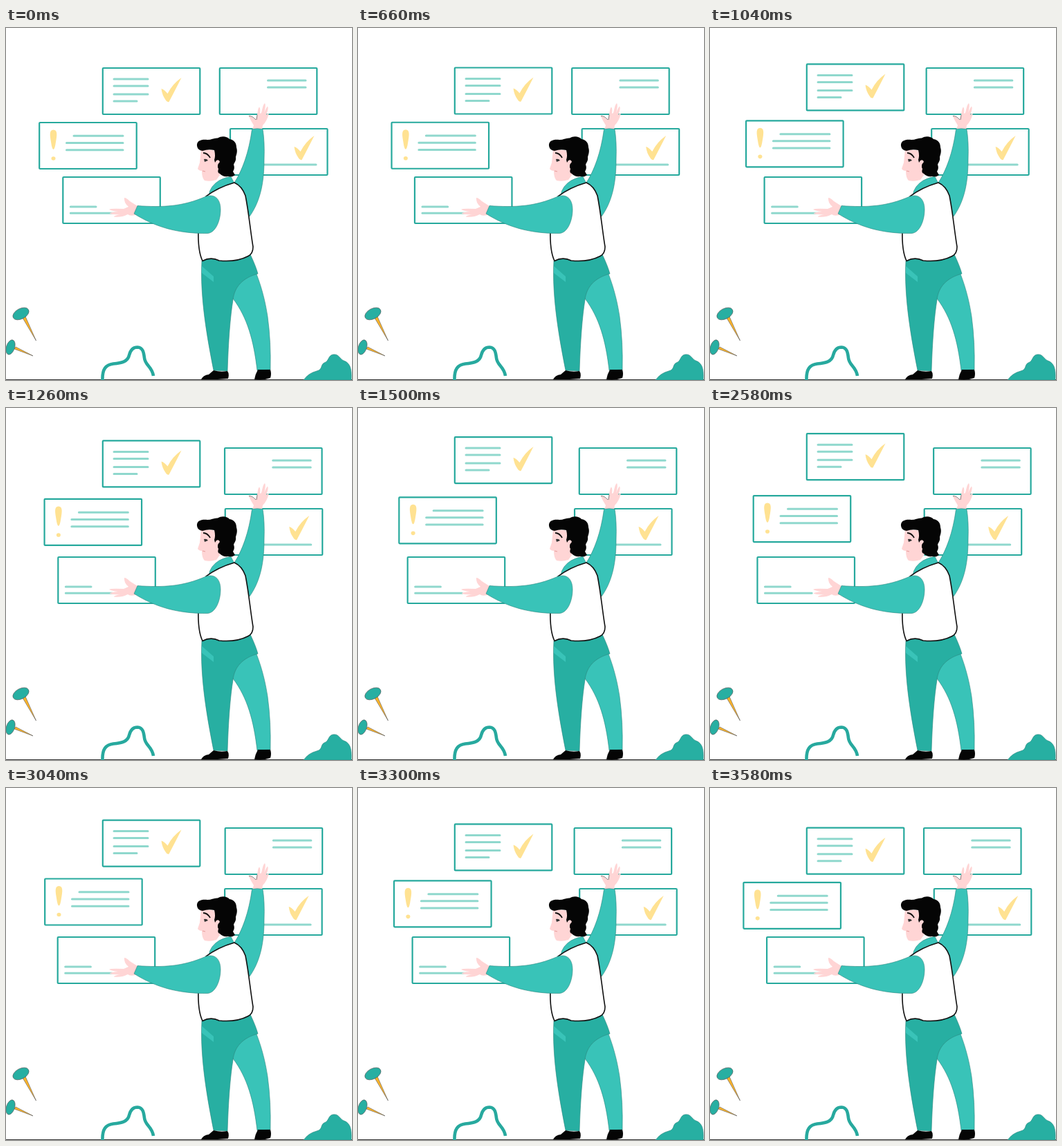
An HTML page for the animation above (3600 ms loop, 500x510 px).

```html
<!DOCTYPE html>
<html lang="en">
<head>
<meta charset="utf-8">
<title>Arranging cards</title>
<style>
  html, body { margin: 0; width: 100%; height: 100%; overflow: hidden; background: #fff; }
  svg { display: block; }
  .line { fill: none; stroke: #8fd8cd; stroke-width: 3; stroke-linecap: round; }
  .mark { fill: #ffe292; }
  .dark { fill: #27afa2; }
  .light { fill: #39c3b8; }
  .edge { stroke: #2b857d; stroke-width: .6; }
  .skin { fill: #ffd5d5; }
  .ink { fill: #050505; }
</style>
</head>
<body>
<svg width="500" height="510" viewBox="0 0 500 510">
  <defs>
    <rect id="frame" width="140.5" height="67" rx="1" fill="#fff" stroke="#26a99d" stroke-width="2.2"/>
    <path id="check" class="mark" d="M0 16Q4 17 9 23Q16 9 29 0Q21 16 11 35Q8 36 6 32Q1 25 0 16Z"/>
  </defs>

  <g class="card" data-dx="0" data-dy="-21.5">
    <use href="#frame" x="139.8" y="58"/>
    <path class="line" d="M156 74H205M156 84H205M156 96H205M156 106H189"/>
    <use href="#check" x="224.5" y="72"/>
  </g>
  <g class="card" data-dx="15" data-dy="-10.3">
    <use href="#frame" x="48.2" y="137"/>
    <path class="line" d="M98 156.3H169M87.5 166.5H169M87.5 176.7H169"/>
    <path class="mark" d="M68.5 147.500C75 147.5 73.5 156 72 165Q70.5 176 68.5 176Q66.5 176 65 165C63.5 156 62 147.5 68.5 147.5Z"/>
    <ellipse class="mark" cx="68.5" cy="189" rx="3" ry="2.8"/>
  </g>
  <g class="card" data-dx="-14.3" data-dy="0">
    <use href="#frame" x="82.3" y="216"/>
    <path class="line" d="M93.3 259H130M93.3 268.3H161"/>
  </g>
  <g class="card" data-dx="14.8" data-dy="0">
    <use href="#frame" x="308.8" y="58"/>
    <path class="line" d="M378.5 76H433M378.5 86H433"/>
  </g>
  <g class="card" data-dx="-14.8" data-dy="0">
    <use href="#frame" x="324" y="146"/>
    <path class="line" d="M362 198H448"/>
    <use href="#check" x="416.5" y="156"/>
  </g>

  <!-- ground, plants and pins -->
  <path d="M0 509.5H500" stroke="#333"/>
  <path class="dark edge" d="M430 510Q437 500 449 497C458 495 454 488 460 485C467 483 465 474 473 473C481 472 482 479 488 482C497 485 500 493 499 510Z"/>
  <path d="M139.5 510C139 494 144 488 155 486.500C166 485.500 176 484 178 474C180 466 184 462.500 190 462.500C198 463 199 470 200 478C201 489 211 490 213 504" fill="none" stroke="#27a99e" stroke-width="4.6"/>
  <g stroke="#555" stroke-width=".6">
    <path d="M24 420L28 418L43.5 453Z" fill="#ffb52b"/>
    <path d="M12 465L14 462L39 475Z" fill="#ffb52b"/>
    <ellipse class="dark" cx="21.5" cy="414" rx="12.5" ry="7.5" transform="rotate(-28 21.5 414)"/>
    <ellipse class="dark" cx="6.5" cy="462.5" rx="6" ry="11" transform="rotate(18 6.5 462.5)"/>
  </g>

  <!-- raised arm -->
  <path class="skin" d="M356 147L358 141Q353 133 350.5 127Q353 126 361 133Q362 129 363 126Q364 116 366 114.5Q368 116 367 124L369 123Q372 109 374 109Q376 111 373 123Q376 115 378 113.5Q380 116 376 126Q380 122 379.5 125Q377 135 371 141L370 147Z"/>
  <path d="M351 127.5Q356 127 361 133M363 126L362 133" fill="none" stroke="#555" stroke-width=".7"/>
  <path class="light edge" d="M355.5 146.5Q363 145 371 146.5Q374 165 373 191C373 220 369 249 352 273L341 242L330 224C341 207 351 181 355.5 146.5Z"/>

  <!-- legs and shoes -->
  <path class="light edge" d="M349 330C362 351 373 384 378 418Q383 455 382 495L363 496C358 453 349 420 328 392L318 360Z"/>
  <path class="dark edge" d="M283 337L300 328L353 328Q361 345 364 356C342 362 330 375 328 394Q322 431 320 497L300 496C291 450 280 390 283 337Z"/>
  <path class="light" d="M283 345L300 360V368L283 355Z"/>
  <path class="ink" d="M282 509Q285 503 293 502L300 496Q310 499 320 497Q323 501 321 508L306 509ZM359 509Q360 502 364 495H382Q384 501 382 507Q371 511 359 509Z"/>

  <!-- head -->
  <path class="skin" d="M282 176L280 195L277 204Q279 207 283 207Q283 217 287 221Q295 223 304 220L312 209L310 178Z"/>
  <path class="ink" d="M276 171C275 163 283 161 291 162C297 162 301 159 306 159.500C312 156 319 157 323 161C330 162 333 167 333 173C335 179 333 183 332 187C333 192 330 195 329 198C331 203 329 206 328 208L331 213Q326 217 321 215Q313 216 309 211Q305 210 307 204Q304 199 309 194Q308 190 304 192L302 195L301 191Q303 185 301 177Q292 175 284 178Q277 177 276 171Z"/>
  <path d="M285 181Q291 181 295 188" fill="none" stroke="#111" stroke-width="1.8"/>
  <path d="M286 190Q290 189 292 192L287 194Z" fill="#333"/>
  <path d="M284 207L288 208" stroke="#e79b9b"/>

  <!-- collar and vest -->
  <path class="light edge" d="M293 242Q295 229 308 221Q317 216 325 215.5L330 225Q309 231 293 242Z"/>
  <path d="M289 244Q306 231 330 224Q341 229 346 243C351 268 353 293 357 317Q357 327 350 330.5C334 339 318 338 308 337Q296 331 284 337.5Q277 323 278 292Z" fill="#fff" stroke="#111" stroke-width="1.6"/>

  <!-- reaching arm -->
  <path class="skin" d="M187 271Q179 273 176 270Q166 275 156 273.5Q155 272 165 270Q156 271 150 269Q149 267 162 266Q153 265 149 263Q151 261 170 262L177 259Q170 253 171 246Q174 246 179 251L190 258Z"/>
  <path class="light edge" d="M190 257.500C226 260 255 259 289 244C301 240 310 247 310 263C310 279 303 297 291 297.5C252 298 218 290 185 269Z"/>
</svg>
<script>
const HALF = 1800, START = 740, TRAVEL = 1060;
const cards = [...document.querySelectorAll('.card')];

// Slow creep, then a gently eased glide.
function progress(t) {
  const creep = 0.03 * Math.min(1, t / START) ** 2;
  const u = Math.max(0, (t - START) / TRAVEL);
  return Math.max(creep, u - 0.025 * Math.sin(2 * Math.PI * u));
}

function draw(now) {
  const t = now % (2 * HALF);
  const p = t < HALF ? progress(t) : 1 - progress(t - HALF);
  for (const card of cards) {
    const { dx, dy } = card.dataset;
    card.setAttribute('transform', `translate(${dx * p} ${dy * p})`);
  }
  requestAnimationFrame(draw);
}
draw(performance.now());
</script>
</body>
</html>
```
